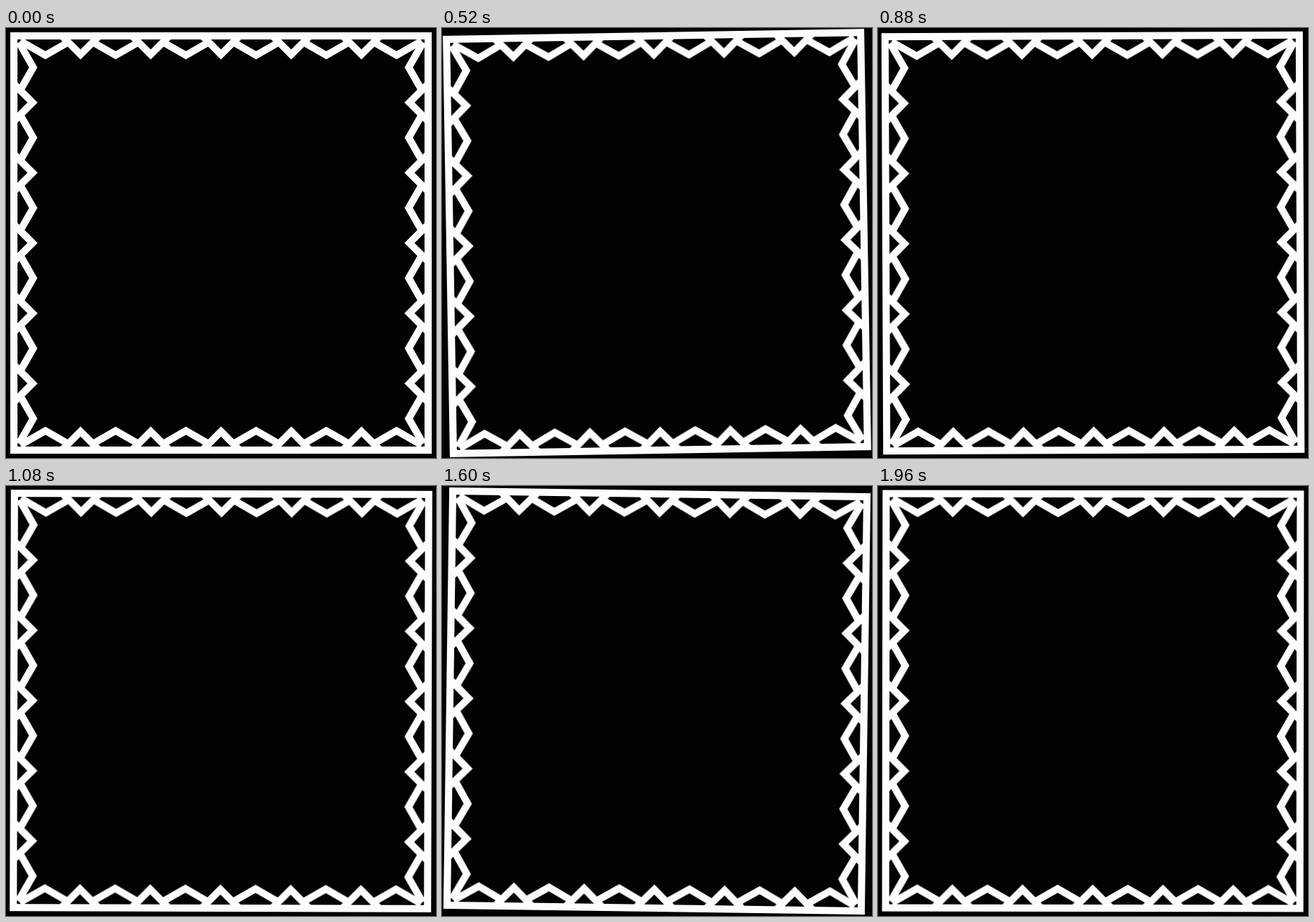
Write an HTML page without scripts that moves like this. It is 600 px wide and 600 px high and loops after 2 s.

```html
<!DOCTYPE html>
<html lang="en">
<head>
<meta charset="utf-8">
<title>Swaying frame</title>
<style>
  html, body {
    margin: 0;
    width: 100%;
    height: 100%;
    overflow: hidden;
    background: #020202;
  }
  svg {
    display: block;
    width: 100%;
    height: 100%;
  }
  .frame {
    fill: none;
    stroke: #fdfdfd;
    stroke-width: 10;
    transform-origin: 300px 300px;
    animation: sway 2s linear infinite;
  }
  @keyframes sway {
    0%, 100% { transform: rotate(0deg); }
    25% { transform: rotate(-1deg); }
    75% { transform: rotate(1deg); }
  }
</style>
</head>
<body>
<svg viewBox="0 0 600 600">
  <defs>
    <path id="wide" d="M20 18l35 20 35-20"/>
    <path id="narrow" d="M78 11l26 26 26-26"/>
    <g id="pair">
      <use href="#wide"/>
      <use href="#narrow"/>
    </g>
    <g id="side">
      <use href="#pair"/>
      <use href="#pair" x="98"/>
      <use href="#pair" x="196"/>
      <use href="#pair" x="294"/>
      <use href="#pair" x="392"/>
      <use href="#wide" x="490"/>
    </g>
  </defs>
  <g class="frame">
    <rect x="11" y="11" width="578" height="578"/>
    <use href="#side"/>
    <use href="#side" transform="rotate(90 300 300)"/>
    <use href="#side" transform="rotate(180 300 300)"/>
    <use href="#side" transform="rotate(270 300 300)"/>
  </g>
</svg>
</body>
</html>
```
